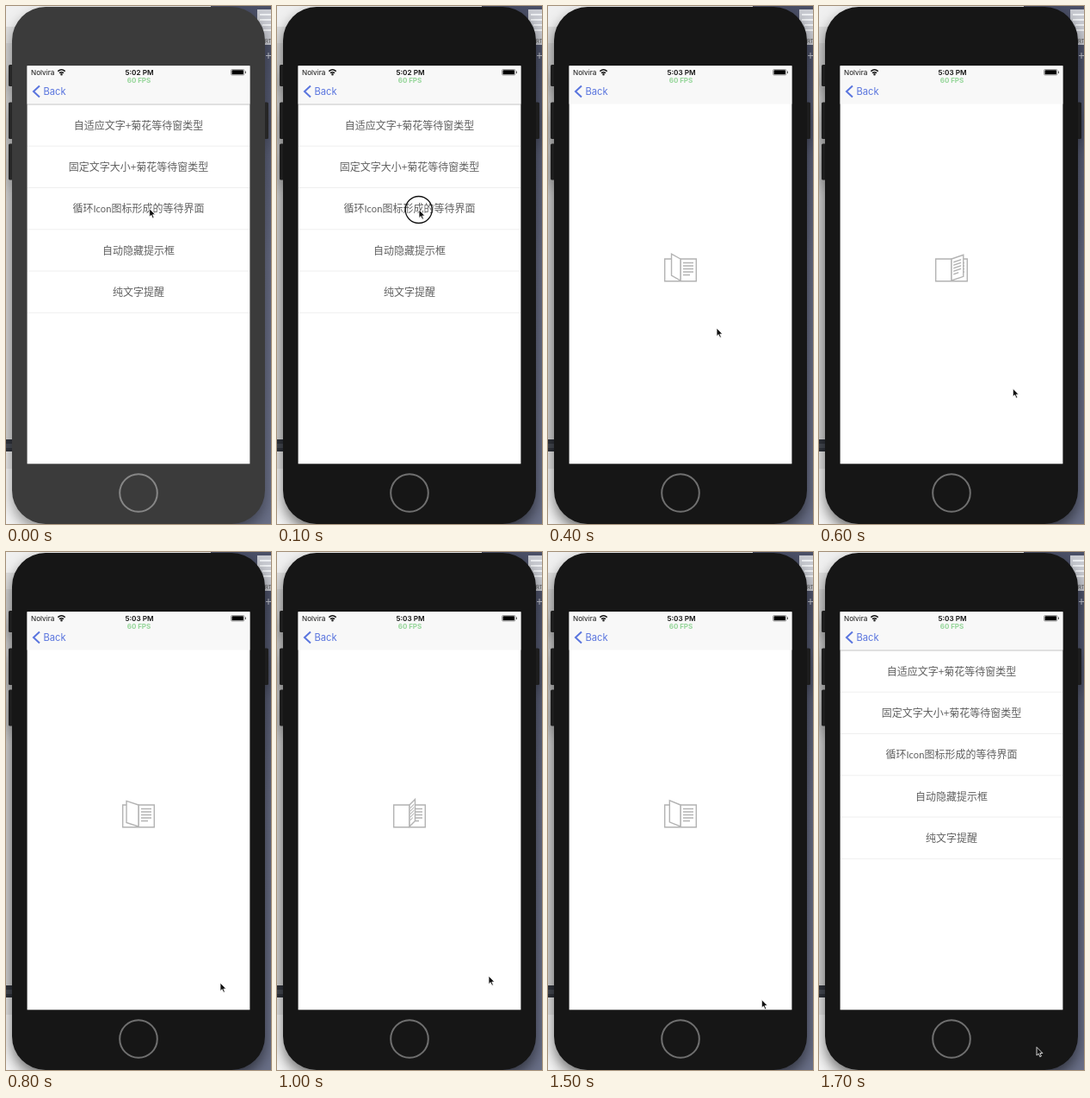
These frames come from a looping animation (308 by 600 pixels, 1.8 s). An HTML page:

```html
<!DOCTYPE html>
<html lang="zh-CN">
<head>
<meta charset="utf-8">
<title>Loading demo</title>
<style>
html, body { margin: 0; width: 100%; height: 100%; overflow: hidden; background: #d2d2d2; }
svg { display: block; width: 100vw; height: 100vh; }
svg { --body: #161616; --key: #1d1d1d; --home: #6f6f6f; --shade: #0008; }
svg.idle { --body: #3b3b3b; --key: #262626; --home: #868686; --shade: #0006; }
.phone { filter: drop-shadow(0 8px 8px var(--shade)); }
.body { fill: var(--body); }
.key { fill: var(--key); }
.home { fill: none; stroke: var(--home); stroke-width: 2; }
text { font-family: Inter, sans-serif; }
.status { font-size: 8.2px; fill: #111; }
.mid { text-anchor: middle; }
.rows text { font: 12px "Noto Sans CJK SC", "Noto Sans CJK", sans-serif; fill: #606060; }
.rows tspan { font: 11.2px Lato, sans-serif; }
.rows path { stroke: #efefef; }
.book { fill: #fff; stroke: #b3b3b3; stroke-width: 1.4; }
.book * { vector-effect: non-scaling-stroke; }
.hide { display: none; }
</style>
</head>
<body>
<svg id="stage" viewBox="0 0 308 600">
  <defs>
    <linearGradient id="slate" x2="0" y2="1">
      <stop offset="0" stop-color="#4a4f66"/>
      <stop offset=".5" stop-color="#666b82"/>
      <stop offset="1" stop-color="#6a7088"/>
    </linearGradient>
    <path id="lines" d="M3 297.5H15M3 301H15M3 304.500H15M3 308H15M3 311.500H11"/>
  </defs>

  <!-- desktop -->
  <rect width="308" height="600" fill="#d2d2d2"/>
  <rect width="240" height="24" fill="#f0f0f0"/>
  <rect y="24" width="240" height="19" fill="#dedede"/>
  <rect y="502" width="60" height="14" fill="#30333b"/>
  <rect y="507" width="60" height="5" fill="#454952"/>
  <rect y="516" width="60" height="20" fill="#e6e6e6"/>
  <rect y="536" width="60" height="64" fill="#f4f4f4"/>
  <rect x="238" width="70" height="600" fill="url(#slate)"/>
  <rect x="292" y="4" width="16" height="41" fill="#c9cbd2"/>
  <path d="M295 10h13M295 16h13M298 22h10M298 28h10" stroke="#eef0f3" stroke-width="2"/>
  <text x="301" y="43" font-size="6" fill="#555">RT</text>
  <path d="M302 57.500h6M305 54v7" stroke="#c5c8d2"/>

  <!-- phone -->
  <g class="phone">
    <g class="key">
      <rect x="3" y="68" width="8" height="25" rx="1.5"/>
      <rect x="3" y="111.500" width="8" height="42.500" rx="1.5"/>
      <rect x="3" y="159.500" width="8" height="42" rx="1.5"/>
      <rect x="297" y="111.500" width="8" height="42.500" rx="1.5"/>
    </g>
    <rect class="body" x="7" y="1" width="294" height="599" rx="39"/>
  </g>
  <circle class="home" cx="154" cy="564" r="21.800"/>
  <rect x="24.600" y="69.300" width="258.800" height="461" fill="#fff"/>
  <rect x="24.600" y="69.300" width="258.800" height="44.200" fill="#f8f8f8"/>

  <!-- status and navigation bars -->
  <text class="status" x="29" y="80">Nolvira</text>
  <g fill="none" stroke="#111" stroke-width="1.500">
    <path d="M60.300 75.600q4.200-3.600 8.400 0M62 77.700q2.500-2 5 0"/>
    <circle cx="64.500" cy="79.300" r=".5"/>
  </g>
  <text class="status mid" id="clock" x="155" y="80" font-weight="600"></text>
  <text class="mid" x="154.500" y="88.500" font-size="8" font-weight="700" fill="#96d69a">60 FPS</text>
  <rect x="261.500" y="73.500" width="15.500" height="6.500" rx="1.300" fill="#fff" stroke="#777" stroke-width=".7"/>
  <rect x="262.500" y="74.300" width="13.500" height="5" rx=".6"/>
  <path d="M278.400 75.500v2.500" stroke="#555"/>
  <path d="M39 92.500L32 99l7 6.500" fill="none" stroke="#5a75de" stroke-width="2"/>
  <text x="43.500" y="103" font-size="11.200" fill="#5a75de">Back</text>

  <g class="rows" id="rows">
    <path d="M25 114H283" style="stroke:#c4c4c4"/>
  </g>

  <g class="book" id="book">
    <path d="M135.700 293H154V318.700H135.700ZM154 293H172.300V318.700H154Z"/>
    <use href="#lines" x="154"/>
    <g id="leaf">
      <path d="M0 293H18.500V318H0Z"/>
      <use href="#lines" id="print"/>
    </g>
  </g>

  <circle id="ring" cx="164.700" cy="236" r="15.500" fill="none" stroke="#111" stroke-width="1.300"/>
  <path id="cursor" d="M0 0V9.600L2.200 7.600 3.800 11.200 5.400 10.500 3.900 7H6.900Z" fill="#111" stroke="#fff" stroke-width=".8"/>
</svg>
<script>
const $ = id => document.getElementById(id);
const STEP = 100, STEPS = 18, SPINE = 154;
const labels = ['自适应文字+菊花等待窗类型', '固定文字大小+菊花等待窗类型',
  '循环<tspan>Icon</tspan>图标形成的等待界面', '自动隐藏提示框', '纯文字提醒'];

$('rows').innerHTML += labels.map((label, i) => {
  const y = 114 + i * 48.25;
  return `<text class="mid" x="154" y="${y + 28.8}">${label}</text>
    <path d="M25 ${y + 48.25}H283"/>`;
}).join('');

// Keys are [step, value...]
const pointer = [[0, 166.7, 234.7], [1, 165, 236], [2, 166, 240], [4, 196, 373], [7, 240, 478],
  [8, 249, 499], [10, 246, 491], [14, 246, 491], [17, 253, 573.5]];
const turn = [[2, -336], [4, -235.5], [8, -41], [10, 69.5], [13, 216], [16, 362]];

function sample(keys, step) {
  const n = keys.findIndex(k => k[0] >= step);
  if (n <= 0) return keys.at(n).slice(1);
  const a = keys[n - 1], b = keys[n];
  const p = (step - a[0]) / (b[0] - a[0]);
  return a.slice(1).map((v, i) => v + (b[i + 1] - v) * p);
}

const show = (id, on) => $(id).classList.toggle('hide', !on);

function turnLeaf(step) {
  const deg = (sample(turn, step)[0] + 360) % 180;
  const a = deg * Math.PI / 180;
  $('leaf').setAttribute('transform',
    `matrix(${Math.cos(a)} ${-0.38 * Math.sin(a)} 0 1 ${SPINE} 0)`);
  show('print', deg < 90);
}

function draw(step) {
  const loading = step >= 2 && step < 16;
  $('stage').classList.toggle('idle', step === 0);
  $('clock').textContent = step < 2 ? '5:02 PM' : '5:03 PM';
  show('rows', !loading);
  show('book', loading);
  show('ring', step === 1);
  $('cursor').setAttribute('transform', `translate(${sample(pointer, step)})`);
  if (loading) turnLeaf(step);
}

const start = performance.now();
let last = -1;
function tick() {
  const step = Math.floor((performance.now() - start) / STEP) % STEPS;
  if (step !== last) draw(last = step);
  requestAnimationFrame(tick);
}
tick();
</script>
</body>
</html>
```
